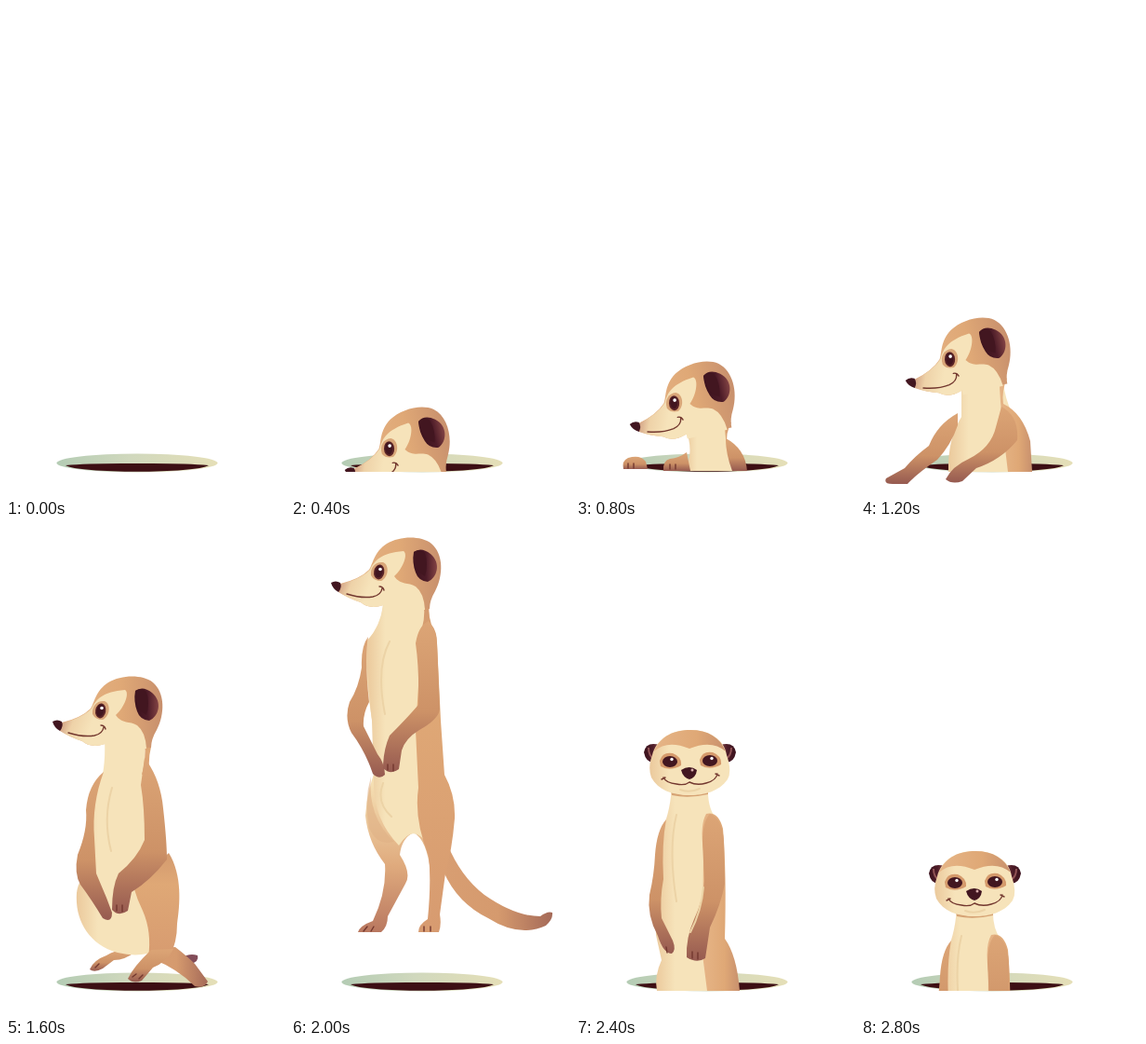
These frames come from a looping animation (300 by 527 pixels, 3.2 s). An HTML page:

```html
<!DOCTYPE html>
<html lang="en">
<head>
<meta charset="utf-8">
<title>Meerkat and burrow</title>
<style>
html, body { margin: 0; width: 100%; height: 100%; overflow: hidden; background: #fff; }
svg { display: block; width: 100vw; height: 100vh; }
.pose { display: none; }
.cream { fill: url(#cream); }
.tan { fill: url(#tan); }
.back { fill: url(#back); }
.arm { fill: url(#arm); }
.dark { fill: #421620; }
.line { fill: none; stroke: #73382f; stroke-width: 1.4; stroke-linecap: round; }
.soft { fill: none; stroke: #ecd3a6; stroke-width: 2; stroke-linecap: round; }
</style>
</head>
<body>
<svg viewBox="0 0 300 527">
<defs>
  <linearGradient id="rim"><stop stop-color="#b4ccb4"/><stop offset=".45" stop-color="#d0d8bd"/><stop offset="1" stop-color="#e5dfb7"/></linearGradient>
  <linearGradient id="cream"><stop stop-color="#ebc99c"/><stop offset=".25" stop-color="#f6e3ba"/><stop offset="1" stop-color="#f6e3ba"/></linearGradient>
  <linearGradient id="tan"><stop stop-color="#e6b587"/><stop offset=".6" stop-color="#dfa876"/><stop offset="1" stop-color="#c8906d"/></linearGradient>
  <linearGradient id="back" x2="0" y2="1"><stop stop-color="#d39a6e"/><stop offset=".3" stop-color="#dfa876"/><stop offset="1" stop-color="#d79b70"/></linearGradient>
  <linearGradient id="arm" x2="0" y2="1"><stop stop-color="#dca576"/><stop offset=".6" stop-color="#cd9267"/><stop offset="1" stop-color="#965a50"/></linearGradient>
  <linearGradient id="leg" x2="0" y2="1"><stop offset=".55" stop-color="#f5dfb3"/><stop offset=".8" stop-color="#dfaa7d"/><stop offset="1" stop-color="#b97860"/></linearGradient>
  <linearGradient id="tail"><stop stop-color="#d89e72"/><stop offset=".5" stop-color="#d59a6e"/><stop offset="1" stop-color="#a56a58"/></linearGradient>
  <linearGradient id="face" gradientUnits="userSpaceOnUse" x1="50" y1="60" x2="90" y2="76"><stop stop-color="#c99279"/><stop offset=".35" stop-color="#eed2a8"/><stop offset=".8" stop-color="#f6e3ba"/></linearGradient>
  <linearGradient id="ear"><stop stop-color="#3b121d"/><stop offset=".55" stop-color="#4d1c28"/><stop offset="1" stop-color="#824344"/></linearGradient>
  <clipPath id="above"><path d="M0 0H300V500H0Z"/></clipPath>

  <g id="sideHead">
    <path class="tan" d="M53 63Q74 58 84 48C88 42 89 29 103 20C117 12 139 11 151 20C164 31 164 54 155 71Q149 81 149 90L99 86Q84 91 75 83Q62 79 52 72Z"/>
    <path fill="url(#face)" d="M50 64Q74 59 85 48C90 38 97 30 121 28C126 31 121 46 111 55C118 65 126 61 134 66Q143 73 144 91H100V86Q84 91 75 83Q62 79 51 72Z"/>
    <path fill="#d9a679" d="M86 54C85 45 91 39 99 40C106 43 105 56 97 60Q89 60 86 54Z"/>
    <ellipse fill="#5a2427" cx="94.8" cy="50.5" rx="5.6" ry="8" transform="rotate(10 95 50)"/>
    <ellipse class="dark" cx="94.5" cy="50" rx="4" ry="6.5" transform="rotate(10 95 50)"/>
    <circle cx="96" cy="47.5" r="1.8" fill="#fff"/>
    <path class="dark" d="M43 62Q48 59 53 62Q55 67 51 72Q45 69 43 62Z"/>
    <path class="line" d="M60 74Q76 79 88 77Q97 75 98 68M95 66Q99 66 100 70"/>
    <path fill="url(#ear)" d="M132 29Q140 23 150 31C162 41 157 57 147 61Q137 60 134 51Q130 40 132 29Z"/>
    <path class="dark" d="M132 29Q138 25 144 30Q148 42 144 55Q135 50 132 39Z"/>
  </g>

  <g id="frontEar">
    <path fill="url(#ear)" d="M90 236Q75 232 73 244Q75 255 84 255Z"/>
    <path d="M78 239Q78 248 84 251" fill="none" stroke="#925456" stroke-width="2"/>
  </g>
  <g id="frontEye">
    <path fill="#d59a6c" d="M90 253Q93 243 104 245Q114 249 113 258Q101 265 91 259Z"/>
    <ellipse class="dark" cx="101" cy="254" rx="8" ry="6"/>
    <circle cx="103" cy="251.5" r="1.7" fill="#fff"/>
  </g>
  <g id="frontPose">
    <path class="cream" d="M103 280H142Q141 303 150 314L151 400Q152 452 169 500H87Q84 484 92 467L86 440Q84 380 88 335Q101 315 103 280Z"/>
    <path fill="#d6a374" d="M102 285Q121 295 142 285V289Q121 294 103 290Z"/>
    <path class="tan" d="M140 310Q153 307 158 326Q162 374 160 444Q173 462 176 500H141L136 461L137 350Q133 322 140 310Z"/>
    <path class="arm" d="M97 316Q87 327 85 354Q84 376 79 397Q76 419 88 441Q94 460 103 460Q108 456 104 446L92 422Q90 401 94 380Q92 342 97 316Z"/>
    <path class="arm" d="M144 310Q157 314 159 339L160 385Q156 407 144 432L139 465Q130 471 119 464Q118 443 127 423Q137 402 138 382L136 340Q136 318 144 310Z"/>
    <path class="soft" d="M108 311Q99 348 108 404M137 389Q135 414 123 437"/>
    <path class="line" d="M125 458V465M131 459V466M97 453L98 459"/>
    <use href="#frontEar"/><use href="#frontEar" transform="matrix(-1 0 0 1 245 0)"/>
    <path class="cream" d="M122 220C146 220 160 232 162 247Q168 264 163 273C154 286 138 290 122 290C103 290 88 284 81 271Q77 260 82 247C86 231 101 220 122 220Z"/>
    <path class="tan" d="M84 243C91 226 106 220 123 220C142 220 155 228 161 243Q146 230 122 240Q98 230 84 243Z"/>
    <use href="#frontEye"/><use href="#frontEye" transform="translate(43 -1)"/>
    <path class="dark" d="M113 263Q122 257 130 263Q129 271 122 273Q115 271 113 263Z"/>
    <circle cx="125" cy="263" r="1.5" fill="#d7adab"/>
    <path class="line" d="M94 271Q97 277 108 278Q117 280 122 276Q130 280 140 277Q151 274 152 267M92 273L96 271M150 267L154 269"/>
    <path class="soft" d="M112 284Q122 288 133 283" stroke-width="3"/>
  </g>
  <g id="paw">
    <path class="arm" d="M1 13Q-1 4 6 1Q19 -3 25 5L27 13Z"/>
    <path class="line" d="M6 7V12M12 7V12"/>
  </g>
</defs>

<g id="hole">
  <ellipse cx="141" cy="490.5" rx="86.5" ry="10" fill="url(#rim)"/>
  <path fill="#3d0f14" d="M64 493Q90 490.5 141 491Q192 490.5 218 493C205 502 77 502 64 493Z"/>
</g>

<g class="pose"></g>

<g class="pose" clip-path="url(#above)">
  <use href="#sideHead" transform="translate(8 415) rotate(-13 139 43)"/>
</g>

<g class="pose" clip-path="url(#above)">
  <path class="tan" d="M150 440L167 447Q160 460 163 470L160 485Z"/>
  <path class="cream" d="M117 440H160Q159 472 169 499H117Q128 478 117 452Z"/>
  <path class="arm" d="M161 464Q182 475 184 499H168Q161 481 161 464Z"/>
  <use href="#sideHead" transform="translate(8 366) rotate(-13 139 43)"/>
  <use href="#paw" transform="translate(50 484)"/>
  <path class="arm" d="M94 499Q93 488 101 486Q111 485 119 479L123 499Z"/>
  <path class="line" d="M101 492V497M107 492V497"/>
</g>

<g class="pose">
  <g clip-path="url(#above)">
    <path class="cream" d="M108 393H152Q154 433 174 452L181 500H94Q93 465 108 441Z"/>
    <path class="tan" d="M148 392L157 400Q151 413 153 427Q174 437 182 467L184 500H158Q153 463 150 425Z"/>
  </g>
  <path class="arm" d="M104 437Q82 449 73 472Q58 483 47 496L27 507Q24 513 34 513H50Q60 502 82 487Q97 471 104 450Z"/>
  <path class="arm" d="M151 430Q170 440 168 466Q151 487 124 496L109 510Q98 514 91 508Q98 494 116 486Q140 474 145 452Z"/>
  <use href="#sideHead" transform="translate(-2 319) rotate(-13 139 43)"/>
</g>

<g class="pose">
  <path fill="#824d59" d="M188 465Q197 459 206 462Q208 469 198 471Z"/>
  <path fill="url(#tail)" d="M150 455L182 453Q195 463 203 471L217 490Q213 498 203 495Q184 476 158 466Z"/>
  <path class="arm" d="M90 477Q94 467 108 462Q122 453 139 458Q128 467 116 467L104 476Q95 481 90 477Z"/>
  <path class="cream" d="M106 230H150Q148 260 154 273L166 370Q171 410 164 456Q145 465 120 459C88 450 74 423 76 395Q78 377 94 372L90 303Q96 280 104 267Q107 251 106 230Z"/>
  <path class="back" d="M149 232L156 238Q153 250 154 264L146 268Q151 250 149 232Z"/>
  <path class="back" d="M138 391Q155 370 175 352C190 376 187 408 184 428Q184 448 176 463L153 464Q157 437 147 414Q141 402 138 391L146 377L135 388Z"/>
  <path class="arm" d="M156 456L180 455Q173 469 158 475L146 489Q137 493 131 487Q137 474 156 456Z"/>
  <path class="arm" d="M105 265Q88 279 86 306Q88 327 77 354Q73 374 80 386Q92 402 104 422Q114 428 114 416L108 400L97 374L95 336Q92 300 105 265Z"/>
  <path class="arm" d="M149 250Q166 272 169 304Q173 340 173 359Q155 382 135 394L131 414Q121 421 114 413Q114 388 121 374Q141 358 149 338Q149 303 145 279Z"/>
  <path class="soft" d="M114 282Q104 315 113 350"/>
  <path class="line" d="M119 408V414M125 408V415M136 485L140 482M143 487L147 483M96 475L100 471"/>
  <use href="#sideHead" transform="translate(7 149)"/>
</g>

<g class="pose">
  <path fill="url(#tail)" d="M168 342Q182 377 208 397Q241 420 268 420Q276 414 281 416Q282 423 274 430Q245 443 212 422Q179 406 164 372Z"/>
  <path fill="url(#leg)" d="M99 82H147Q149 106 153 118L162 280Q174 310 163 355L150 372Q146 338 132 330Q119 336 117 354Q130 374 123 385L104 420Q104 431 97 437H72Q74 430 88 425Q103 394 101 364Q83 341 80 312Q82 285 91 262L88 215Q78 155 82 124Q96 109 99 86Z"/>
  <path class="cream" d="M99 82H147L160 220L159 320L148 345Q132 318 116 344Q88 315 89 275L87 210Q79 145 83 123Q98 106 99 84Z"/>
  <path fill="#e0b186" opacity=".6" d="M86 270Q82 313 111 340Q92 345 84 325Q78 297 86 270Z"/>
  <path class="back" d="M142 82L149 85Q147 95 151 107Q157 114 157 127L161 210L165 268Q177 290 176 315Q173 350 166 374L160 418Q162 429 159 437H137Q137 429 147 423Q151 383 148 355Q132 316 137 282L134 220L141 110Q145 95 142 82Z"/>
  <path class="arm" d="M83 120Q75 130 76 153Q73 174 63 190Q57 207 65 223Q80 243 88 267Q95 274 101 268Q101 256 93 246L78 216Q77 203 84 190Q79 145 83 120Z"/>
  <path class="arm" d="M148 103Q156 112 157 127L160 198Q158 209 138 220Q123 229 119 242L116 262Q107 269 99 261Q99 242 106 226Q125 207 137 193Q138 155 134 127Q137 108 148 103Z"/>
  <path class="soft" d="M106 125Q91 153 101 203M99 277Q91 298 108 313"/>
  <path class="line" d="M104 257V263M110 257V264M78 436L82 431M86 436L89 431M143 436V431M150 436V431"/>
  <use href="#sideHead"/>
</g>

<g class="pose" clip-path="url(#above)"><use href="#frontPose"/></g>
<g class="pose" clip-path="url(#above)"><use href="#frontPose" transform="translate(0 130)"/></g>
</svg>
<script>
const HOLD = 400;
const poses = [...document.querySelectorAll('.pose')];
const start = performance.now();

function draw() {
  const elapsed = Math.max(0, performance.now() - start);
  const current = Math.floor(elapsed / HOLD) % poses.length;
  poses.forEach((pose, i) => { pose.style.display = i === current ? 'inline' : 'none'; });
  requestAnimationFrame(draw);
}
draw();
</script>
</body>
</html>
```
